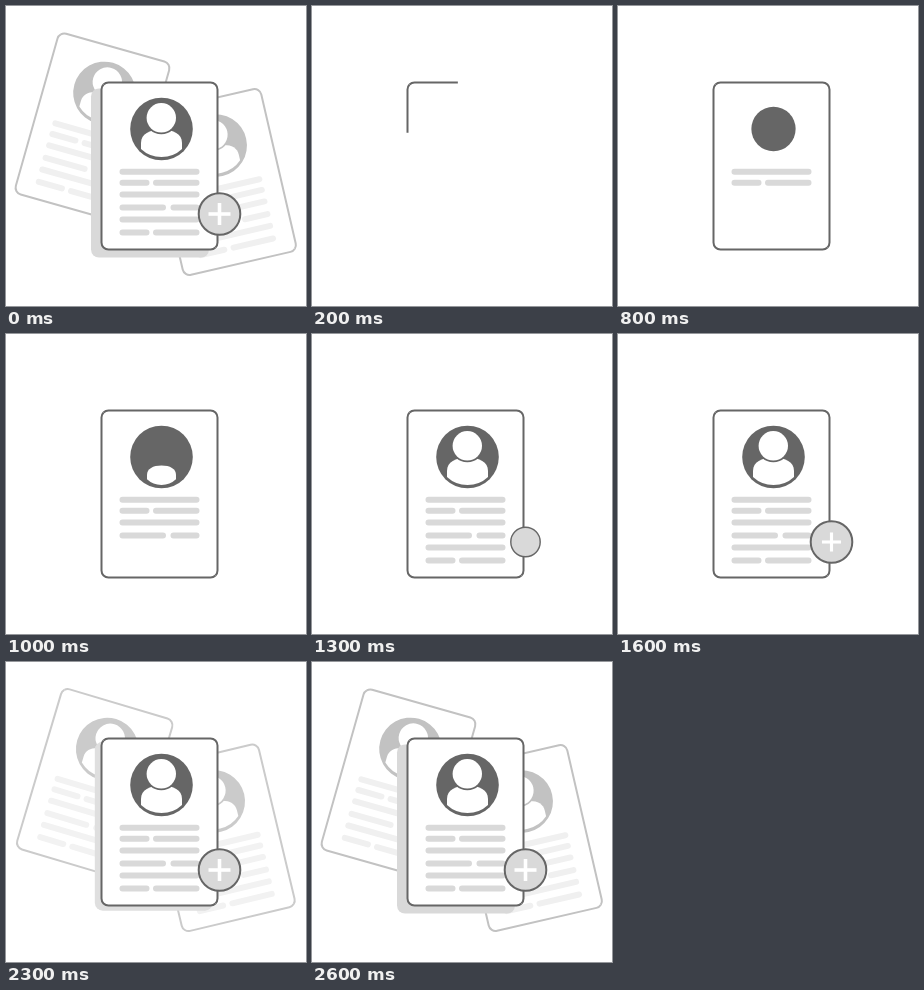
An HTML page with a canvas that plays this animation: 300 by 300 pixels, repeating every 9.3 s.

```html
<!DOCTYPE html>
<html lang="en">
<head>
<meta charset="utf-8">
<title>Profile cards</title>
<style>
  html, body { margin: 0; width: 100%; height: 100%; overflow: hidden; background: #fff; }
  canvas { display: block; width: 300px; height: 300px; }
</style>
</head>
<body>
<canvas id="stage"></canvas>
<script>
const LOOP = 9300, STEP = 100, END = 2600;
const DARK = 102, LIGHT = 217;
const W = 116, H = 167, R = 7, CX = 153.5, CY = 160;

const canvas = document.getElementById('stage');
const ctx = canvas.getContext('2d');
const ratio = window.devicePixelRatio || 1;
canvas.width = canvas.height = 300 * ratio;

// Text line segments per row: y, then start/end pairs, relative to the card centre
const ROWS = [
  [5.7, -40, 40],
  [16.7, -40, -10, -6.5, 40],
  [28.5, -40, 40],
  [41.5, -40, 6.5, 11, 40],
  [53.6, -40, 40],
  [66.5, -40, -10, -6.5, 40]
];

const progress = (t, from, to) => Math.min(1, Math.max(0, (t - from) / (to - from)));
const easeOut = u => Math.sin(u * Math.PI / 2);
const mix = (a, b, u) => a + (b - a) * u;

// Grey value faded towards white
function grey(value, alpha = 1) {
  const v = Math.round(mix(255, value, alpha));
  return `rgb(${v},${v},${v})`;
}

function disc(x, y, r, fill, stroke) {
  ctx.beginPath();
  ctx.arc(x, y, r, 0, Math.PI * 2);
  ctx.fillStyle = fill;
  ctx.fill();
  if (stroke) {
    ctx.strokeStyle = stroke;
    ctx.lineWidth = 2;
    ctx.stroke();
  }
}

function at(x, y, scale, draw) {
  if (scale <= 0) return;
  ctx.save();
  ctx.translate(x, y);
  ctx.scale(scale, scale);
  draw();
  ctx.restore();
}

function drawBody() {
  ctx.beginPath();
  ctx.moveTo(-20.5, -8);
  ctx.lineTo(-20.5, -14);
  ctx.bezierCurveTo(-20.5, -23, -12, -27.5, 0, -27.5);
  ctx.bezierCurveTo(12, -27.5, 20.5, -23, 20.5, -14);
  ctx.lineTo(20.5, -8);
  ctx.quadraticCurveTo(12, 0, 0, 0);
  ctx.quadraticCurveTo(-12, 0, -20.5, -8);
  ctx.fillStyle = '#fff';
  ctx.fill();
}

function drawAvatar(dark, circle, body, head) {
  at(2, -37, circle, () => disc(0, 0, 31.3, dark));
  at(2, -9, body, drawBody);
  at(1.8, -48.2, head, () => {
    disc(0, 0, 16.5, dark);
    disc(0, 0, 14.7, '#fff');
  });
}

function drawRows(count, color) {
  ctx.strokeStyle = color;
  ctx.lineWidth = 6;
  ctx.lineCap = 'round';
  ctx.beginPath();
  for (const [y, ...xs] of ROWS.slice(0, count)) {
    for (let i = 0; i < xs.length; i += 2) {
      ctx.moveTo(xs[i] + 3, y);
      ctx.lineTo(xs[i + 1] - 3, y);
    }
  }
  ctx.stroke();
  ctx.lineCap = 'butt';
}

function fillCard(color, grow = 0) {
  ctx.beginPath();
  ctx.roundRect(-W / 2 - grow, -H / 2 - grow, W + grow * 2, H + grow * 2, R + grow);
  ctx.fillStyle = color;
  ctx.fill();
}

// Both halves run from the top left corner to the bottom right one
function strokeCard(color, part) {
  if (part <= 0) return;
  const x = W / 2, y = H / 2, ix = x - R, iy = y - R, q = Math.PI / 4;
  const length = W + H - 4 * R + Math.PI * R;
  ctx.strokeStyle = color;
  ctx.lineWidth = 2;
  if (part < 1) ctx.setLineDash([length * part, length * 2]);
  ctx.beginPath();
  ctx.arc(-ix, -iy, R, -3 * q, -2 * q);
  ctx.arcTo(x, -y, x, y, R);
  ctx.arc(ix, iy, R, 0, q);
  ctx.stroke();
  ctx.beginPath();
  ctx.arc(-ix, -iy, R, -3 * q, -4 * q, true);
  ctx.arcTo(-x, y, x, y, R);
  ctx.arc(ix, iy, R, 2 * q, q, true);
  ctx.stroke();
  ctx.setLineDash([]);
}

function drawSideCard(x, y, degrees, alpha) {
  at(x, y, 1, () => {
    ctx.rotate(degrees * Math.PI / 180);
    fillCard('#fff');
    drawAvatar(grey(DARK, alpha), 1, 1, 1);
    drawRows(ROWS.length, grey(LIGHT, alpha));
    strokeCard(grey(DARK, alpha), 1);
  });
}

function drawBehind(t) {
  const fade = progress(t, 1720, 2400);
  if (fade <= 0) return;
  const move = 1 - (1 - progress(t, 1700, END)) ** 1.5;
  drawSideCard(mix(98, 86.5, move), 122, mix(20, 15.8, move), fade * 0.4);
  drawSideCard(mix(207.5, 216, move), mix(175, 176, move), mix(-15.2, -13, move), fade * 0.4);
  const slide = progress(t, 2000, 2500);
  if (slide > 0) {
    at(CX - 9.5 * slide, CY + 7 * slide, 1, () => fillCard(grey(LIGHT, fade), 1));
  }
}

function drawBadge(t) {
  at(213.5, 208, easeOut(progress(t, 1200, 1400)), () => {
    disc(0, 0, 20.8, grey(LIGHT), grey(DARK));
  });
  at(213.5, 208, easeOut(progress(t, 1400, 1700)), () => {
    ctx.fillStyle = '#fff';
    ctx.fillRect(-11, -1.8, 22, 3.6);
    ctx.fillRect(-1.8, -11, 3.6, 22);
  });
}

function drawScene(t) {
  ctx.setTransform(ratio, 0, 0, ratio, 0, 0);
  ctx.fillStyle = '#fff';
  ctx.fillRect(0, 0, 300, 300);
  drawBehind(t);
  at(CX, CY, 1, () => {
    fillCard('#fff');
    drawAvatar(
      grey(DARK),
      easeOut(progress(t, 600, 1000)),
      easeOut(progress(t, 900, 1100)),
      easeOut(progress(t, 1000, 1200))
    );
    drawRows(Math.max(0, Math.floor((t - 600) / 100)), grey(LIGHT));
    strokeCard(grey(DARK), progress(t, 100, 600) ** 1.08);
  });
  drawBadge(t);
}

function tick() {
  const time = Math.floor((performance.now() % LOOP) / STEP) * STEP;
  // The loop opens on the finished picture
  drawScene(time < STEP ? END : time);
  requestAnimationFrame(tick);
}
tick();
</script>
</body>
</html>
```
